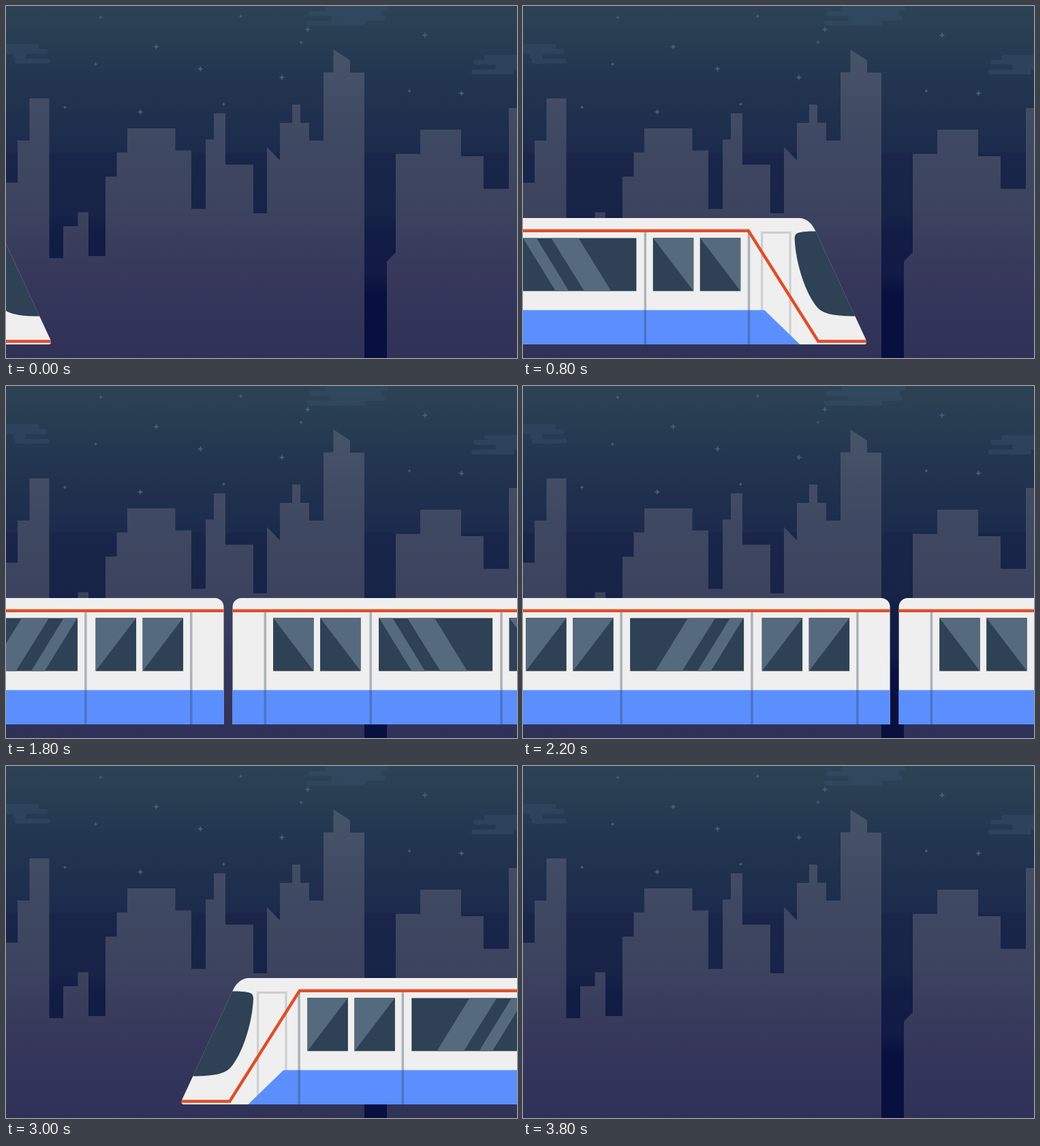
Recreate the animation shown at these times as an HTML page. Size 750 by 518 pixels, loop 3.9 s.

```html
<!DOCTYPE html>
<html lang="en">
<head>
<meta charset="utf-8">
<title>Night train</title>
<style>
  html, body { margin: 0; width: 100%; height: 100%; overflow: hidden; background: #1c2a4c; }
  svg { display: block; width: 750px; height: 518px; }
</style>
</head>
<body>
<svg viewBox="0 0 750 518" xmlns="http://www.w3.org/2000/svg">
  <defs>
    <linearGradient id="sky" gradientUnits="userSpaceOnUse" x1="0" y1="0" x2="0" y2="518">
      <stop offset="0" stop-color="#2d4354"/>
      <stop offset=".2" stop-color="#233650"/>
      <stop offset=".417" stop-color="#1c2b4c"/>
      <stop offset=".417" stop-color="#192649"/>
      <stop offset=".59" stop-color="#172347"/>
      <stop offset=".64" stop-color="#121d45"/>
      <stop offset=".76" stop-color="#111b44"/>
      <stop offset=".82" stop-color="#091040"/>
      <stop offset="1" stop-color="#08103f"/>
    </linearGradient>
    <linearGradient id="town" gradientUnits="userSpaceOnUse" x1="0" y1="64" x2="0" y2="518">
      <stop offset="0" stop-color="#465468"/>
      <stop offset=".3" stop-color="#3f4862"/>
      <stop offset=".52" stop-color="#3c435e"/>
      <stop offset=".75" stop-color="#36375b"/>
      <stop offset="1" stop-color="#2f3157"/>
    </linearGradient>
    <linearGradient id="mist" gradientUnits="userSpaceOnUse" x1="0" y1="10" x2="0" y2="70">
      <stop offset="0" stop-color="#30495e"/>
      <stop offset="1" stop-color="#2e425c"/>
    </linearGradient>
    <g id="car">
      <path fill="#efefef" d="M113.5 498V325A13 13 0 0 1 126.5 312H733C744 312 752.500 319 757.800 331L832 491Q834.500 498 829 498Z"/>
      <path fill="none" stroke="#cdcdcd" stroke-width="3" d="M679.300 448V333.500H720.700V486"/>
      <path fill="#5b8fff" d="M113.500 447.500H683L735 498H113.500Z"/>
      <path fill="#2e4155" d="M758.100 331.500C747 331.500 738 332 732 334Q727 336 727.300 343C729 380 744 425 761 444C770 454 789 456.300 816.100 456.500Z"/>
      <g id="panes"></g>
      <path fill="#2e4155" d="M328 341.500H495V419.500H328Z"/>
      <path fill="#566a7e" d="M328.500 341.500H348.300L396 419.500H376.500ZM370 341.500H410L458 419.500H418.500Z"/>
      <path fill="none" stroke="#2f4054" stroke-opacity=".35" stroke-width="3.500" d="M161.300 333V498M316.200 333V498M508 333V498M660.200 333V498"/>
      <path fill="none" stroke="#e04e2a" stroke-width="4.500" d="M113.500 330.800H659.500L762 493.400H832.700"/>
    </g>
  </defs>

  <rect width="750" height="518" fill="url(#sky)"/>
  <path id="clouds" fill="none" stroke="url(#mist)" stroke-width="7.300" stroke-linecap="round"/>
  <path id="stars" fill="#455d73"/>
  <path fill="url(#town)" d="M0 518V260H17V198H34.500V136H63.500V371H84V324H105.500V303.500H121V368H146V251H162.500V215.500H178V180H248.500V212.500H272V298.500H293V196.500H305V158H322V233.500H363V305H383V207.500L402 227V172H420V145H432V172H445V198H466V97.500H480.500V64L505 80V98H526V518ZM559 518V376L572 362.500V217.500H608V182H668V221H701V269H738V150H750V518Z"/>

  <g id="train">
    <use href="#car"/>
    <use href="#car" transform="matrix(-1 0 0 1 214 0)"/>
  </g>
</svg>
<script>
  const LOOP = 3900, STEP = 100, SPEED = 54.77;
  const REST = 14;   // step at which the train stands at its drawn position
  const GONE = 38;   // step at which it has left
  const byId = id => document.getElementById(id);

  // Two pairs of square windows, each with a diagonal glare
  let panes = '';
  for (let i = 0; i < 4; i++) {
    const x = 173 + 69 * (i % 2) + 346.4 * (i >> 1);
    panes += `<path fill="#2e4155" d="M${x} 341.2h59.500v78.300h-59.500z"/>` +
             `<path fill="#566a7e" d="M${x} 341.2h59.500v78.300z"/>`;
  }
  byId('panes').innerHTML = panes;

  // Four stacked bars; dir mirrors the cloud, base and shelf are bar lengths
  function cloud(x, y, dir, base, shelf) {
    const rows = [[base * 0.3, base * 1.4], [3, base * 1.3], [35, shelf], [0, base]];
    return rows.map(([a, b], i) =>
      `M${x + dir * (a + 3.6)} ${y + 3.6 + 7.2 * i}H${x + dir * (b - 3.6)}`).join('');
  }
  byId('clouds').setAttribute('d',
    cloud(64, 56, -1, 51, 54) + cloud(442, 0, 1, 85, 115) + cloud(683, 72, 1, 63, 70));

  // Four-pointed star: even points reach r, odd points stay near the centre
  function star(x, y, r) {
    let d = '';
    for (let i = 0; i < 8; i++) {
      const a = i * Math.PI / 4, s = i % 2 ? r * 0.42 : r;
      d += `${i ? 'L' : 'M'}${x + s * Math.cos(a)} ${y + s * Math.sin(a)}`;
    }
    return d + 'Z';
  }
  const large = [[197, 156], [220.5, 60], [285.5, 92.5], [405, 105], [443, 34.5], [615, 43], [668.5, 128.5]];
  const small = [[86.5, 149], [131.5, 85.5], [139, 16.5], [319.5, 144.5], [344.5, 15], [433, 53.5], [592, 125]];
  byId('stars').setAttribute('d',
    large.map(p => star(...p, 4.6)).join('') + small.map(p => star(...p, 3)).join(''));

  const train = byId('train');
  function draw(ms) {
    const n = Math.floor((ms % LOOP) / STEP);
    train.setAttribute('transform', `translate(${(SPEED * (n - REST)).toFixed(2)} 0)`);
    train.setAttribute('visibility', n < GONE ? 'visible' : 'hidden');
  }

  let start;
  function tick(now) {
    start ??= now;
    draw(Math.max(0, now - start));
    requestAnimationFrame(tick);
  }
  draw(0);
  requestAnimationFrame(tick);
</script>
</body>
</html>
```
